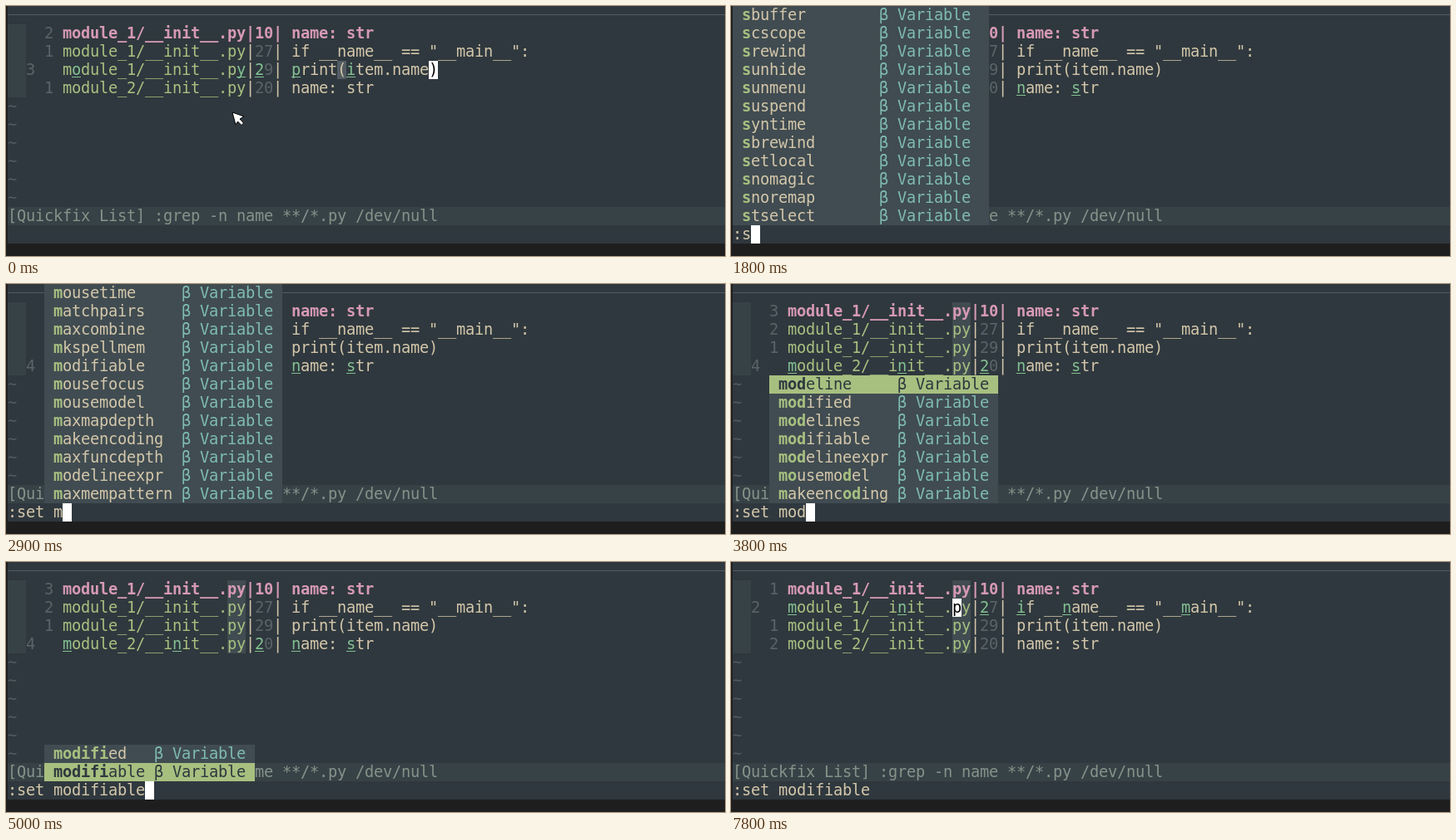
An HTML page with a canvas for the animation above (8000 ms loop, 864 by 301 pixels).

```html
<!DOCTYPE html>
<html lang="en">
<head>
<meta charset="utf-8">
<title>Editor command completion</title>
<style>
  html, body { margin: 0; width: 100%; height: 100%; overflow: hidden; background: #1f1e1f; }
  canvas { display: block; }
</style>
</head>
<body>
<canvas id="stage" width="864" height="301"></canvas>
<script>
const ctx = document.getElementById('stage').getContext('2d');
const LOOP = 8000;
const CELL_W = 11, CELL_H = 22, LEFT = 2, BASELINE = 17;
const TEXT_COL = 6, PY_COL = 24, CMD_ROW = 12;
const FONT = '18.67px "DejaVu Sans Mono", monospace';

const C = {
  frame: '#1f1e1f', bg: '#2f383e', bar: '#374247', menu: '#404c51', paren: '#525c62',
  fg: '#d3c6aa', dim: '#596469', tilde: '#525c62', status: '#859289',
  green: '#a7c080', aqua: '#83c092', blue: '#7fbbb3', pink: '#d699b6', cursor: '#ffffff'
};

const LINES = [
  ['module_1', '10', 'name: str'],
  ['module_1', '27', 'if __name__ == "__main__":'],
  ['module_1', '29', 'print(item.name)'],
  ['module_2', '20', 'name: str']
].map(([dir, num, code]) => ({ path: dir + '/__init__.py', num, code }));
const fullLine = l => `${l.path}|${l.num}| ${l.code}`;

const menu = (col, key, words, extra = {}) =>
  ({ col, key, words: words.split(' '), sel: -1, len: 0, pad: 0, ...extra });

const MENUS = {
  s: menu(0, 's', 'sbuffer scscope srewind sunhide sunmenu suspend syntime sbrewind setlocal snomagic snoremap stselect', { len: 14, pad: 1 }),
  se: menu(0, 'se', 'set sleep snext source srewind syntime setlocal sbrewind stselect setglobal spellgood setfiletype', { sel: 0 }),
  set: menu(0, 'set', 'set setlocal setglobal setfiletype', { sel: 0 }),
  all: menu(4, '', 'aleph arabic autoread ambiwidth autochdir autowrite altkeymap autoindent background allowrevins arabicshape autowriteall', { len: 14, pad: 1 }),
  m: menu(4, 'm', 'mousetime matchpairs maxcombine mkspellmem modifiable mousefocus mousemodel maxmapdepth makeencoding maxfuncdepth modelineexpr maxmempattern'),
  mo: menu(4, 'mo', 'mouse modeline modified modelines mousehide mousetime modifiable mousefocus mousemodel maxcombine modelineexpr makeencoding', { sel: 0 }),
  mod: menu(4, 'mod', 'modeline modified modelines modifiable modelineexpr mousemodel makeencoding', { sel: 0 }),
  modi: menu(4, 'modi', 'modified modifiable modeline modelines modelineexpr makeencoding', { sel: 0 }),
  modifi: menu(4, 'modifi', 'modified modifiable', { sel: 0 })
};
const picked = { ...MENUS.modifi, sel: 1 };

// Each entry changes part of the editor state from its time onward.
const EVENTS = [
  [0, { line: 2, col: 46, marks: [7, 25, 27, 31, 37], paren: 36, mouse: [0, 0], words: false, cmd: '', typing: false, menu: null }],
  [200, { line: 3, col: PY_COL, marks: [6, 18, 27, 31, 37], paren: -1, mouse: [1, 1] }],
  [300, { words: true }],
  [1300, { cmd: ':', typing: true, mouse: null }],
  [1700, { cmd: ':s' }],
  [1800, { menu: MENUS.s }],
  [1900, { cmd: ':se' }],
  [2000, { menu: MENUS.se }],
  [2100, { cmd: ':set' }],
  [2200, { menu: MENUS.set }],
  [2300, { cmd: ':set ' }],
  [2400, { menu: MENUS.all }],
  [2700, { cmd: ':set m' }],
  [2900, { menu: MENUS.m }],
  [3100, { cmd: ':set mo' }],
  [3200, { menu: MENUS.mo }],
  [3800, { cmd: ':set mod', menu: MENUS.mod }],
  [3900, { cmd: ':set modi' }],
  [4000, { menu: MENUS.modi }],
  [4100, { cmd: ':set modif' }],
  [4200, { cmd: ':set modifi' }],
  [4300, { menu: MENUS.modifi }],
  [5000, { cmd: ':set modifiable', menu: picked }],
  [5700, { menu: null }],
  [6500, { typing: false }],
  [7500, { line: 2, marks: [6, 18, 27, 31, 39, 43] }],
  [7800, { line: 1, marks: [6, 18, 27, 31, 36, 49] }]
];

const cellX = col => LEFT + col * CELL_W;

function fillCells(col, row, cols, color) {
  ctx.fillStyle = color;
  ctx.fillRect(cellX(col), row * CELL_H, cols * CELL_W, CELL_H);
}

function put(col, row, text, color, bold = false) {
  ctx.font = (bold ? 'bold ' : '') + FONT;
  ctx.fillStyle = color;
  [...text].forEach((ch, i) => {
    if (ch !== ' ') ctx.fillText(ch, cellX(col + i), row * CELL_H + BASELINE);
  });
}

function drawLine(index, s) {
  const line = LINES[index], row = index + 1;
  const text = fullLine(line), current = index === s.line;
  fillCells(0, row, 2, C.bar);
  put(current ? 2 : 4, row, String(current ? row : Math.abs(index - s.line)), C.dim);

  if (s.words) fillCells(PY_COL, row, 2, C.menu);
  if (current && s.paren >= 0) fillCells(s.paren, row, 1, C.paren);

  [...text].forEach((ch, i) => {
    const col = TEXT_COL + i;
    const marked = current && s.marks.includes(col);
    let color = C.fg;
    if (marked) color = C.aqua;
    else if (index === 0) color = C.pink;
    else if (col < 26) color = C.green;
    else if (col === 27 || col === 28) color = C.dim;
    put(col, row, ch, color, index === 0);
    if (marked) ctx.fillRect(cellX(col), row * CELL_H + 19, CELL_W, 1);
  });

  if (current && !s.typing) {
    fillCells(s.col, row, 1, C.cursor);
    put(s.col, row, text[s.col - TEXT_COL], '#000');
  }
}

function drawMenu({ col, key, words, sel, len, pad }) {
  const longest = Math.max(len, ...words.map(w => w.length));
  const top = CMD_ROW - words.length;
  words.forEach((word, i) => {
    const row = top + i, on = i === sel;
    fillCells(col, row, longest + 13 + pad, on ? C.green : C.menu);
    let hit = 0;
    [...word].forEach((ch, j) => {
      const match = ch === key[hit];
      if (match) hit++;
      put(col + 1 + j, row, ch, on ? C.bg : match ? C.green : C.fg, match);
    });
    put(col + longest + 2, row, 'β Variable', on ? C.bg : C.blue);
  });
}

function drawMouse([dx, dy]) {
  const points = [[272, 128], [286, 133], [281, 136], [285.5, 141], [283, 143.5], [278.5, 139], [276, 143]];
  ctx.beginPath();
  points.forEach(([x, y]) => ctx.lineTo(x + dx, y + dy));
  ctx.closePath();
  ctx.fillStyle = '#fff';
  ctx.fill();
  ctx.strokeStyle = '#000';
  ctx.lineWidth = 1;
  ctx.stroke();
}

function draw(time) {
  const s = {};
  for (const [at, change] of EVENTS) if (at <= time) Object.assign(s, change);

  ctx.fillStyle = C.frame;
  ctx.fillRect(0, 0, 864, 301);
  ctx.fillStyle = C.bg;
  ctx.fillRect(LEFT, 0, 862, 286);
  ctx.fillStyle = C.tilde;
  ctx.fillRect(LEFT, 10, 862, 1);

  LINES.forEach((_, i) => drawLine(i, s));
  for (let row = 5; row <= 10; row++) put(0, row, '~', C.tilde);
  fillCells(0, 11, 79, C.bar);
  put(0, 11, '[Quickfix List] :grep -n name **/*.py /dev/null', C.status);
  put(0, CMD_ROW, s.cmd, C.fg);
  if (s.typing) fillCells(s.cmd.length, CMD_ROW, 1, C.cursor);
  if (s.menu) drawMenu(s.menu);
  if (s.mouse) drawMouse(s.mouse);
}

const start = performance.now();
function tick() {
  draw((performance.now() - start) % LOOP);
  requestAnimationFrame(tick);
}
tick();
</script>
</body>
</html>
```
